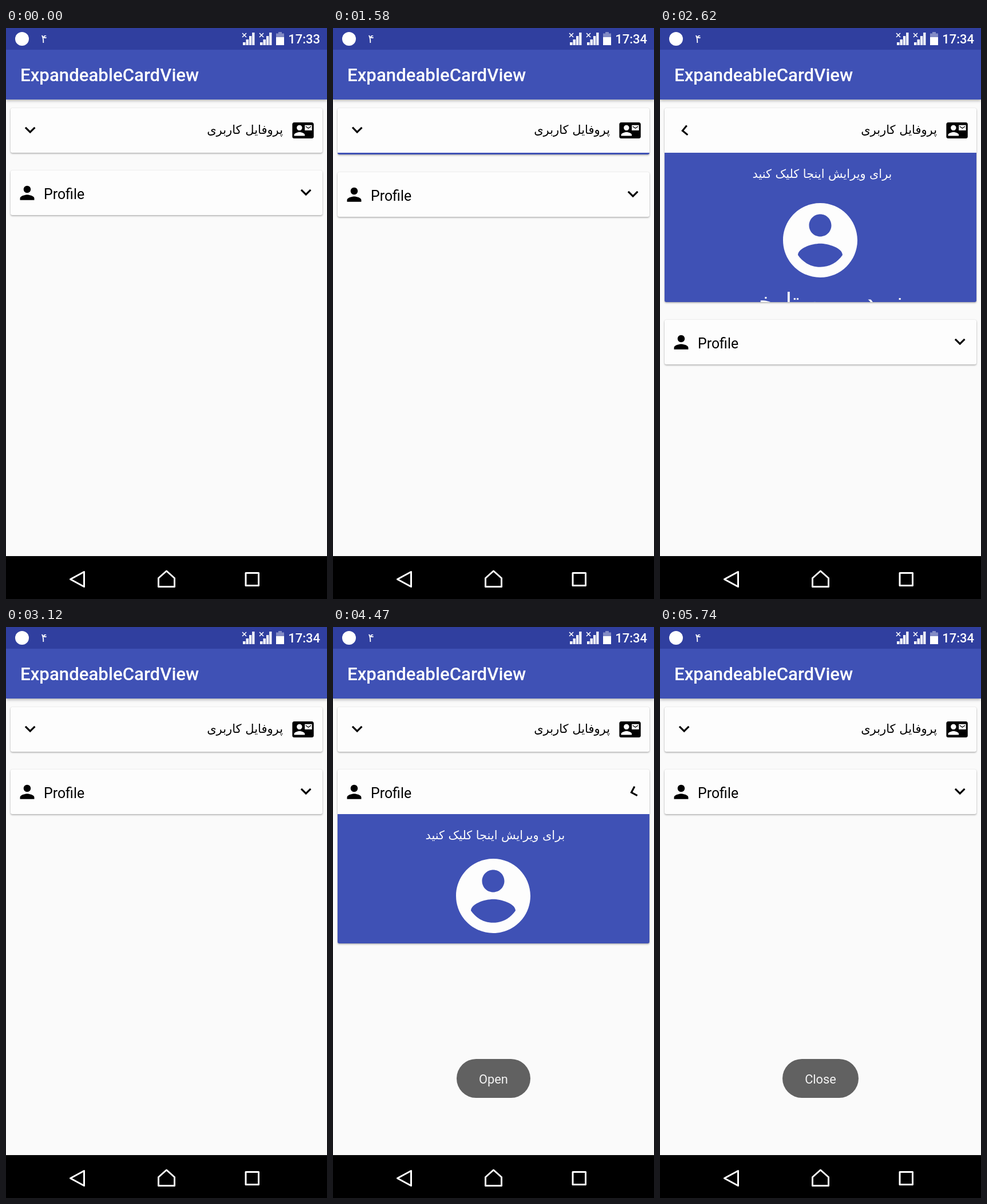
An HTML page for the animation above (6.46 s loop, 561 by 998 pixels).

```html
<!DOCTYPE html>
<html lang="en">
<head>
<meta charset="utf-8">
<title>Expandable cards</title>
<style>
  html, body { margin: 0; width: 100%; height: 100%; overflow: hidden; background: #fafafa; }
  #stage { position: absolute; left: 0; top: 0; width: 561px; height: 998px; overflow: hidden; background: #fafafa; }
  #stage div, svg { position: absolute; display: block; }
  text { font-family: Roboto, "Noto Sans", sans-serif; white-space: pre; }
  .fa { font-family: "DejaVu Sans", "Noto Sans", sans-serif; direction: rtl; }
  .mid { text-anchor: middle; }
  .end { text-anchor: end; }

  .appbar { left: 0; top: 38px; width: 561px; height: 87px; background: #3f51b5; box-shadow: 0 2px 5px rgba(0,0,0,.3); }
  .card {
    left: 7.8px; width: 545.4px; border-radius: 3px; overflow: hidden;
    background: #fdfdfd; box-shadow: 0 1.5px 3px rgba(0,0,0,.3), 0 0 1.5px rgba(0,0,0,.12);
  }
  .content { left: 0; top: 78px; width: 100%; overflow: hidden; }
  .blue { left: 0; top: 0; width: 100%; background: #3f51b5; box-shadow: 0 2px 4px rgba(0,0,0,.3); }
  .grey { left: 0; top: 310px; width: 100%; height: 246px; background: #eaeaea; }
  .details {
    left: 31.2px; top: 30.5px; width: 483px; border-radius: 3px; overflow: hidden;
    background: #fdfdfd; box-shadow: 0 0 2px rgba(0,0,0,.12);
  }
  .toast { top: 755px; height: 68px; border-radius: 34px; background: #616161; opacity: 0; }
</style>
</head>
<body>
<div id="stage">
  <div class="appbar"></div>

  <div class="card" id="first">
    <svg width="546" height="78">
      <text class="fa" x="476" y="45" font-size="21">پروفایل کاربری</text>
      <use href="#mail-card" transform="translate(492.4 20.4) scale(1.558)"/>
      <use class="arrow" href="#chevron"/>
    </svg>
  </div>

  <div class="card" id="second">
    <svg width="546" height="78">
      <use href="#person" transform="translate(10.3 20.6) scale(1.558)"/>
      <text x="58" y="50" font-size="24.9">Profile</text>
      <use class="arrow" href="#chevron"/>
    </svg>
  </div>

  <svg id="chrome" width="561" height="998">
    <defs>
      <path id="chevron" d="M-4.59-4.16L0 .42l4.59-4.58L6-2.75l-6 6-6-6z"/>
      <path id="person" d="M12 12c2.21 0 4-1.79 4-4s-1.79-4-4-4-4 1.79-4 4 1.79 4 4 4zm0 2c-2.67 0-8 1.34-8 4v2h16v-2c0-2.66-5.33-4-8-4z"/>
      <path id="mail-card" d="M21 8V7l-3 2-3-2v1l3 2 3-2zm1-5H2C.9 3 0 3.9 0 5v14c0 1.1.9 2 2 2h20c1.1 0 1.99-.9 1.99-2L24 5c0-1.1-.9-2-2-2zM8 6c1.66 0 3 1.34 3 3s-1.34 3-3 3-3-1.34-3-3 1.34-3 3-3zm6 12H2v-1c0-2 4-3.1 6-3.1s6 1.1 6 3.1v1zm8-6h-8V6h8v6z"/>
      <path id="phone-card" d="M22 3H2C.9 3 0 3.9 0 5v14c0 1.1.9 2 2 2h20c1.1 0 1.99-.9 1.99-2L24 5c0-1.1-.9-2-2-2zM8 6c1.66 0 3 1.34 3 3s-1.34 3-3 3-3-1.34-3-3 1.34-3 3-3zm6 12H2v-1c0-2 4-3.1 6-3.1s6 1.1 6 3.1v1zm3.85-4h1.64L21 16l-1.99 1.99c-1.31-.98-2.28-2.38-2.73-3.99-.18-.64-.28-1.31-.28-2s.1-1.36.28-2c.45-1.62 1.42-3.01 2.73-3.99L21 8l-1.51 2h-1.64c-.22.63-.35 1.3-.35 2s.13 1.37.35 2z"/>
      <path id="envelope" d="M20 4H4c-1.1 0-1.99.9-1.99 2L2 18c0 1.1.9 2 2 2h16c1.1 0 2-.9 2-2V6c0-1.1-.9-2-2-2zm0 4l-8 5-8-5V6l8 5 8-5v2z"/>
      <g id="signal">
        <path d="M2 30v-5h4.500v5zM7.500 30V20H12v10zM13 30V14h4.200v16zM18.200 30V8h4.200v22z"/>
        <path d="M1 9l7 7M8 9l-7 7" fill="none" stroke="#fff" stroke-width="1.6"/>
      </g>
    </defs>

    <rect width="561" height="38" fill="#303f9f"/>
    <g fill="#fff">
      <circle cx="28" cy="19" r="12"/>
      <text class="fa mid" x="66.500" y="26" font-size="20">۴</text>
      <use href="#signal" x="412"/>
      <use href="#signal" x="442"/>
      <path d="M476 7h6v2.500h4V16h-14V9.500h4z" opacity=".4"/>
      <path d="M472 16h14v14h-14z"/>
      <text id="clock" class="end" x="549" y="27" font-size="22" font-weight="500">17:33</text>
      <text x="25" y="93" font-size="31.2" font-weight="500">ExpandeableCardView</text>
    </g>

    <rect y="923" width="561" height="75"/>
    <g fill="none" stroke="#fff" stroke-width="3" stroke-linejoin="round">
      <path d="M112.500 963.500L136.500 950.500V976.500Z"/>
      <path d="M280.500 949L294.500 961.500V976.500H266.500V961.500Z"/>
      <path d="M419 952.500H441.500V974.500H419Z"/>
    </g>
  </svg>

  <div class="toast" id="open" style="left:216px;width:129px">
    <svg width="129" height="68"><text class="mid" x="64.5" y="43" font-size="21.8" fill="#f4f4f4">Open</text></svg>
  </div>
  <div class="toast" id="close" style="left:213.5px;width:133.5px">
    <svg width="134" height="68"><text class="mid" x="66.5" y="43" font-size="21.8" fill="#f4f4f4">Close</text></svg>
  </div>
</div>

<template id="profile">
  <div class="content">
    <div class="grey">
      <div class="details">
        <svg width="483" height="184">
          <g fill="#757575">
            <text class="end" x="405" y="41.500" font-size="23.4">09550100123</text>
            <text class="fa" x="405" y="61.500" font-size="13.3">شماره همراه</text>
            <text class="end" x="405" y="141.500" font-size="23.4">n.m.tarkh26@example.com</text>
            <text class="fa" x="405" y="161.500" font-size="13.3">ایمیل</text>
          </g>
          <path d="M15 84.500H467" stroke="#e2e2e2" stroke-width="1.5"/>
          <g fill="#3f51b5">
            <use href="#phone-card" transform="translate(436 26.5) scale(1.3)"/>
            <use href="#envelope" transform="translate(436 127) scale(1.3)"/>
          </g>
        </svg>
      </div>
    </div>
    <div class="blue">
      <svg width="546" height="310" fill="#fdfdfd">
        <text class="fa mid" x="275.500" y="44" font-size="20.8">برای ویرایش اینجا کلیک کنید</text>
        <text class="fa mid" x="273" y="275" font-size="42.2">نوید مهین تارخی</text>
      </svg>
      <svg class="avatar" viewBox="0 0 24 24" fill="#fdfdfd">
        <path d="M12 2C6.48 2 2 6.48 2 12s4.48 10 10 10 10-4.48 10-10S17.52 2 12 2zm0 3c1.66 0 3 1.34 3 3s-1.34 3-3 3-3-1.34-3-3 1.34-3 3-3zm0 14.2c-2.5 0-4.71-1.28-6-3.22.03-1.99 4-3.08 6-3.08 1.99 0 5.97 1.09 6 3.08-1.29 1.94-3.5 3.22-6 3.22z"/>
      </svg>
    </div>
  </div>
</template>

<script>
const LOOP = 6460, SLIDE = 350, FADE = 500;
const TOP = 140, HEADER = 78, GAP = 31, CONTENT = 556, BLUE = 310;
const $ = id => document.getElementById(id);
const clamp = (v, lo, hi) => Math.min(hi, Math.max(lo, v));
const phase = (t, start, length) => clamp((t - start) / length, 0, 1);
const ease = p => (1 - Math.cos(p * Math.PI)) / 2;
const fadeIn = p => 1 - (1 - p) ** 2;
const fadeOut = p => 1 - p * p;
const px = v => v + "px";

function makeCard(id, arrowX, openAt, closeAt) {
  const root = $(id);
  root.append($("profile").content.cloneNode(true));
  const part = name => root.querySelector("." + name);
  return {
    root, arrowX, openAt, closeAt, arrow: part("arrow"), content: part("content"),
    blue: part("blue"), details: part("details"), avatar: part("avatar")
  };
}

const cards = [
  makeCard("first", 34.2, 1564, 2439),
  makeCard("second", 516.2, 3117, 4275)
];

// Places one card and returns its bottom edge.
function drawCard(card, top, t) {
  const amount = ease(phase(t, card.openAt, SLIDE)) - ease(phase(t, card.closeAt, SLIDE));
  const room = CONTENT * amount;
  card.root.style.top = px(top);
  card.root.style.height = px(HEADER + room);
  card.content.style.height = px(room);
  card.blue.style.height = px(Math.min(BLUE, room));
  card.details.style.height = px(clamp(room - BLUE - 62, 0, 184));
  card.arrow.setAttribute("transform",
    `translate(${card.arrowX} 39.2) rotate(${180 * amount}) scale(1.558)`);

  // The avatar stays centred in its shrinking slot.
  const slot = clamp(room - 61, 0, 184), size = Math.min(156, slot);
  Object.assign(card.avatar.style, {
    left: px(272.7 - size / 2), top: px(61 + (slot - size) / 2),
    width: px(size), height: px(size)
  });
  return top + HEADER + room;
}

function draw(t) {
  cards.reduce((top, card) => drawCard(card, top, t) + GAP, TOP);
  $("clock").textContent = t < 900 ? "17:33" : "17:34";
  $("open").style.opacity = fadeIn(phase(t, 3240, FADE)) * fadeOut(phase(t, 5170, FADE));
  $("close").style.opacity = fadeIn(phase(t, 5230, FADE));
}

const start = performance.now();
function tick() {
  draw((performance.now() - start) % LOOP);
  requestAnimationFrame(tick);
}
tick();
</script>
</body>
</html>
```
